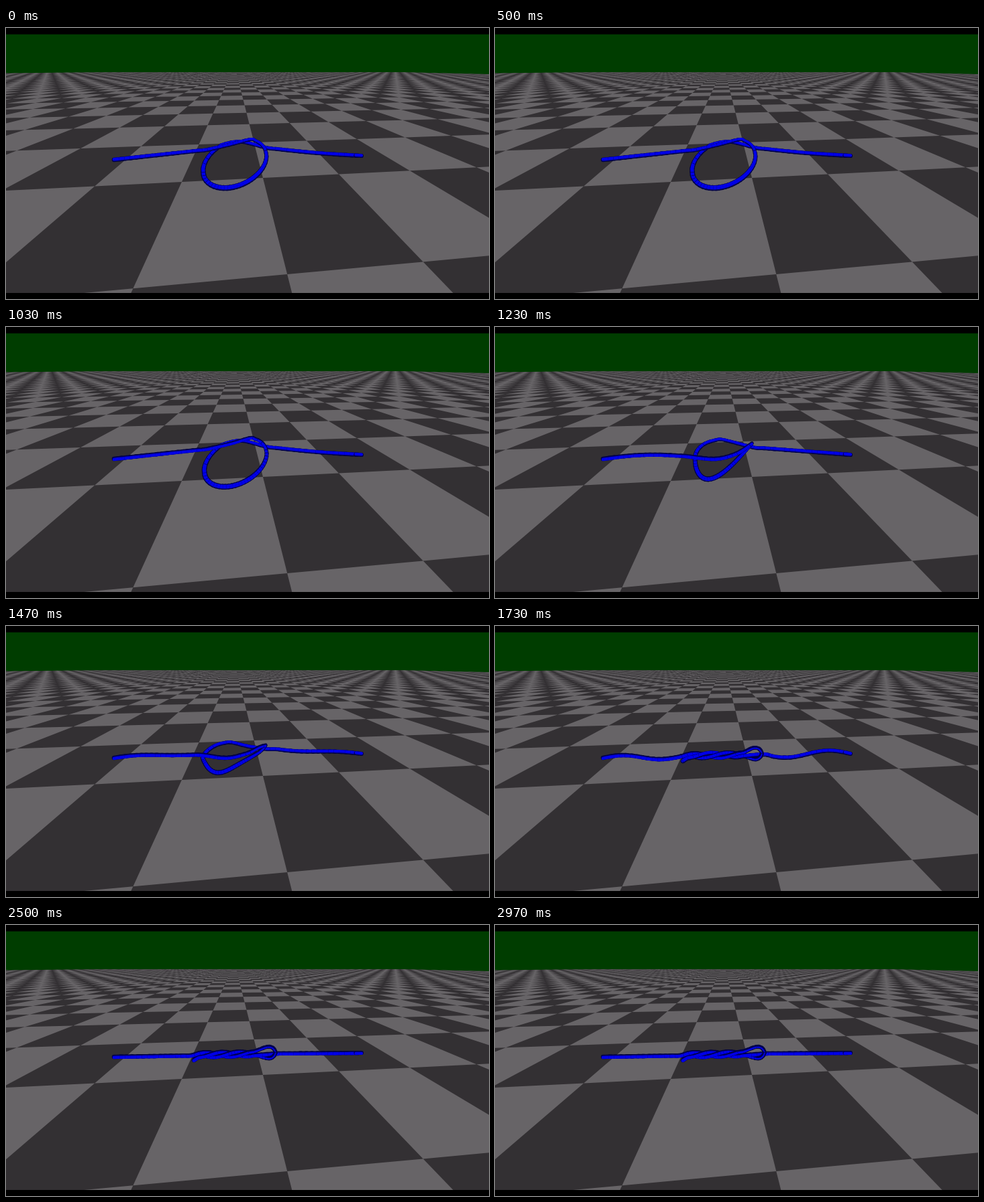
Animation of 720x405 px, one loop 3.01 s. Source, as an HTML page with a canvas:

```html
<!DOCTYPE html>
<html>
<head>
<meta charset="utf-8">
<style>
html, body { margin: 0; width: 100%; height: 100%; overflow: hidden; background: #000; }
canvas { display: block; width: 720px; height: 405px; }
</style>
</head>
<body>
<canvas id="stage" width="720" height="405"></canvas>
<script>
const LOOP = 3010, SAMPLES = 60, TAU = Math.PI * 2;
const LEFT = [161, 197], RIGHT = [530, 191];
const ctx = document.getElementById('stage').getContext('2d');
const lerp = (a, b, k) => a + (b - a) * k;
const clamp = k => Math.max(0, Math.min(1, k));
const progress = (t, from, to) => clamp((t - from) / (to - from));

// Perspective of the floor: one unit is one tile.
function project(u, v) {
  const d = 1 + 0.035 * u + 0.479 * v;
  return [(134.4 * u + 163.3 * v + 262) / d, (1.85 * u + 27.2 * v + 230) / d];
}
const columnAt = (x, v) =>
  (x * (1 + 0.479 * v) - 262 - 163.3 * v) / (134.4 - 0.035 * x);

function trace(c, points) {
  points.forEach(([x, y], i) => i ? c.lineTo(x, y) : c.moveTo(x, y));
}

function paintScene() {
  const canvas = document.createElement('canvas');
  canvas.width = 720;
  canvas.height = 405;
  const c = canvas.getContext('2d');
  c.fillStyle = '#003d00';
  c.fillRect(0, 0, 720, 405);
  c.save();
  c.beginPath();
  trace(c, [[0, 67.5], [150, 66], [590, 66], [720, 69], [720, 405], [0, 405]]);
  c.clip();
  c.fillStyle = '#333033';
  c.fillRect(0, 0, 720, 405);
  c.beginPath();
  for (let row = -2; row < 42; row++) {
    const near = Math.max(row, -1.4), far = row + 1;
    const first = Math.floor(Math.min(columnAt(0, near), columnAt(0, far)));
    const last = Math.ceil(Math.max(columnAt(720, near), columnAt(720, far)));
    for (let col = first; col < last; col++) {
      if ((col + row) % 2 === 0) continue;
      trace(c, [project(col, near), project(col + 1, near),
                project(col + 1, far), project(col, far)]);
      c.closePath();
    }
  }
  c.fillStyle = '#676467';
  c.fill();
  c.restore();
  c.fillStyle = '#000';
  c.fillRect(0, 0, 720, 9.5);
  c.fillRect(0, 396, 720, 9);
  return canvas;
}

// Points of a curve f over a range of its parameter.
const sweep = (f, from, to, n = 10) =>
  Array.from({ length: n + 1 }, (_, i) => f(lerp(from, to, i / n)));

// Free end of the rope, bent into a sine wave.
const tail = (a, b, height = 0, waves = 1) => sweep(k =>
  [lerp(a[0], b[0], k), lerp(a[1], b[1], k) + height * Math.sin(TAU * waves * k)], 0, 1);

// Smooth curve through [x, y, depth] points, resampled evenly by length.
function resample(pts) {
  const dense = [], steps = 12;
  for (let i = 0; i < pts.length - 1; i++) {
    const [a, b, c, d] = [pts[i - 1] || pts[i], pts[i], pts[i + 1], pts[i + 2] || pts[i + 1]];
    for (let s = 0; s < steps; s++) {
      const t = s / steps;
      dense.push(b.map((_, k) => b[k] + 0.5 * t * (c[k] - a[k]
        + t * (2 * a[k] - 5 * b[k] + 4 * c[k] - d[k]
        + t * (3 * (b[k] - c[k]) + d[k] - a[k])))));
    }
  }
  dense.push(pts[pts.length - 1]);
  const dist = [0];
  for (let i = 1; i < dense.length; i++) {
    dist.push(dist[i - 1] + Math.hypot(dense[i][0] - dense[i - 1][0], dense[i][1] - dense[i - 1][1]));
  }
  const total = dist[dist.length - 1], out = [];
  for (let n = 0, j = 0; n <= SAMPLES; n++) {
    const goal = total * n / SAMPLES;
    while (j < dist.length - 2 && dist[j + 1] < goal) j++;
    const k = clamp((goal - dist[j]) / (dist[j + 1] - dist[j]));
    out.push(dense[j].map((value, m) => lerp(value, dense[j + 1][m], k)));
  }
  return out;
}

// A pose has three parts: left end to apex, apex to tip, tip to right end.
// Points without a depth get that of their part: the first lies on top.
const pose = (...parts) => parts.flatMap((part, i) =>
  resample(part.map(([x, y, z = 1 - i / 2]) => [x, y, z])).slice(i ? 1 : 0));

// Open loop: a tilted ellipse whose two ends cross above it.
function ring(cx, cy, rx, ry, tilt) {
  const cos = Math.cos(tilt), sin = Math.sin(tilt);
  const at = turn => {
    const x = rx * Math.cos(turn * TAU), y = ry * Math.sin(turn * TAU);
    return [cx + x * cos + y * sin, cy - x * sin + y * cos];
  };
  return pose(
    [...tail(LEFT, [300, 182]), [335, 174], ...sweep(at, -0.12, 0, 4)],
    sweep(at, 0, 0.56),
    [...sweep(at, 0.56, 0.74, 6), [350, 170], ...tail([388, 179], RIGHT, 1.5, 0.5)]);
}

// Collapsing loop: a teardrop hanging from its right corner.
function teardrop() {
  const at = turn => {
    const reach = Math.sin(turn * Math.PI), bulge = Math.sin(turn * TAU);
    return [383 - 85 * reach, 174 + 22 * reach + bulge * (bulge > 0 ? 37 : 19)];
  };
  return pose(
    [...tail(LEFT, [285, 193], -4, 0.5), [328, 197], [360, 189], at(0)],
    sweep(at, 0, 0.5),
    [...sweep(at, 0.5, 0.83, 6), ...tail([385, 180], RIGHT)]);
}

// Three strands wound around each other, with an eye at the right.
function braid(eye, wave) {
  const strand = phase => sweep(x => {
    const angle = TAU * ((x - 285) / 75 + phase);
    return [x, 194 - 0.02 * (x - 285) + 3.7 * Math.sin(angle), -Math.cos(angle)];
  }, 287, 371, 12);
  const apex = [eye, 190, 1], tip = [280, 202, 0];
  return pose(
    [...tail(LEFT, [276, 195], -wave * 0.7), ...strand(7 / 12),
      [eye - 13, 182, 1], [eye - 4, 183.5, 1], apex],
    [apex, [eye - 3, 196, 1], [eye - 11, 199, 0], ...strand(11 / 12).reverse(), tip],
    [tip, ...strand(1 / 4), ...tail([eye + 3, 192, -1], RIGHT, wave)]);
}

const openLoop = ring(341, 202.5, 50, 33, 0.44);
const leaningLoop = ring(342, 202, 50, 32, 0.49);
const fallingLoop = teardrop();
const wavyBraid = braid(398, 5);
const tightBraid = braid(402, 0);

const keys = [
  { at: 0, shape: openLoop }, { at: 520, shape: openLoop },
  { at: 830, shape: leaningLoop }, { at: 1100, shape: leaningLoop },
  { at: 1230, shape: fallingLoop }, { at: 1700, shape: wavyBraid, power: 2 },
  { at: 1760, shape: wavyBraid }, { at: 2100, shape: tightBraid },
  { at: LOOP, shape: tightBraid }
];

function ropeAt(t) {
  const i = keys.findIndex(key => key.at > t), a = keys[i - 1], b = keys[i];
  const k = progress(t, a.at, b.at) ** (b.power || 1);
  return a.shape.map((p, n) => p.map((value, m) => lerp(value, b.shape[n][m], k)));
}

function stroke(pts, width, color, cap, dy = 0) {
  ctx.beginPath();
  trace(ctx, pts.map(([x, y]) => [x, y + dy]));
  ctx.lineWidth = width;
  ctx.lineCap = cap;
  ctx.lineJoin = 'round';
  ctx.strokeStyle = color;
  ctx.stroke();
}

function drawRope(t) {
  const rope = ropeAt(t), chunks = [], last = rope.length - 1;
  // The lit side turns over as the rope twists, and the eye falls into shade.
  const leftSide = lerp(-0.7, 0.9, progress(t, 560, 760));
  const rightSide = lerp(-0.7, 0.9, progress(t, 1750, 2100));
  const twist = progress(t, 1230, 1700);
  for (let i = 0; i < last; i += 2) {
    chunks.push({ i, pts: rope.slice(i, i + 4), z: rope[i + 1][2] });
  }
  chunks.sort((a, b) => a.z - b.z || a.i - b.i);
  for (const { i, pts } of chunks) {
    const along = i / last, width = (pts[0][1] - 56) * 0.046;
    const cap = i < 2 || i > last - 4 ? 'round' : 'butt';
    const side = lerp(leftSide, rightSide, clamp((along - 0.3) / 0.4));
    const shade = twist * Math.exp(-(((along - 1 / 3) / 0.07) ** 2));
    stroke(pts, width, '#00004c', cap);
    stroke(pts, width * (0.7 - 0.4 * shade), '#0000e8', cap, side);
  }
}

const scene = paintScene();
function frame(now) {
  ctx.drawImage(scene, 0, 0);
  drawRope(now % LOOP);
  requestAnimationFrame(frame);
}
frame(0);
</script>
</body>
</html>
```
